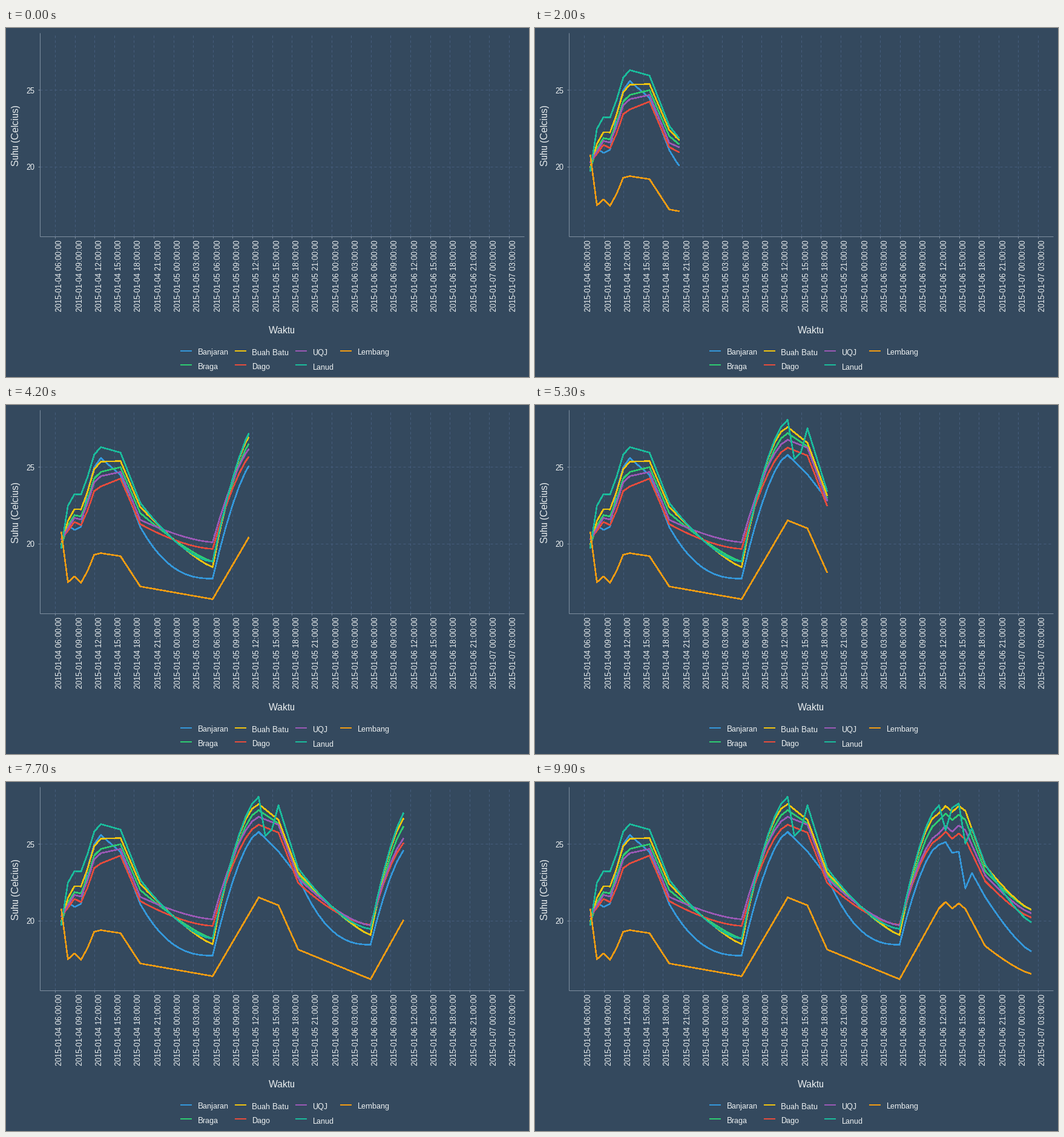
These frames come from a looping animation (864x576 px, 10 s). A matplotlib script:

```python
import numpy as np
import matplotlib.pyplot as plt
from matplotlib.animation import FuncAnimation

W, H = 864, 576
FRAMES, INTERVAL = 100, 100
HOURS = 68
LEFT, RIGHT, TOP, BOTTOM = 55, 855, 7, 343
BG, GRID, AXIS, INK = "#34495e", "#465d7d", "#7f8fa0", "#ecf0f1"

plt.rcParams.update({
    "font.family": "Liberation Sans",
    "text.hinting": "native",
    "text.hinting_factor": 1,
    "path.simplify": False,
})

# Turning points shared by all stations: dawns, noons and evenings
TURNS = np.array([0, 1, 6, 9, 12, 23, 30, 33, 36, 47, 53, 57, 60, 67])
RISES, NIGHTS, LAST = (23, 47), (12, 36), 60

# name, colour, heights at the turns, bend of rises, bend of nights, cloud dips
STATIONS = [
    ("Banjaran", "#3498db",
     [231, 198, 87, 115, 201, 286, 82, 114, 156, 268, 103, 130, 189, 279],
     1.6, 2.5, {2: 30, 3: 27, 57: 45}),
    ("Braga", "#2ecc71",
     [231, 199, 110, 102, 178, 258, 46, 68, 153, 252, 63, 62, 146, 210],
     1.65, 1.25, {}),
    ("Buah Batu", "#f1c40f",
     [229, 191, 93, 92, 168, 267, 36, 62, 149, 252, 51, 47, 137, 210],
     1.75, 1.25, {}),
    ("Dago", "#e74c3c",
     [221, 207, 134, 121, 196, 237, 70, 83, 166, 235, 92, 94, 163, 223],
     1.6, 1.6, {}),
    ("UQJ", "#9b59b6",
     [222, 203, 117, 110, 189, 226, 57, 70, 158, 236, 84, 79, 153, 216],
     1.6, 1.5, {}),
    ("Lanud", "#1abc9c",
     [236, 166, 69, 78, 161, 258, 24, 38, 142, 242, 38, 46, 135, 231],
     1.55, 1.6, {31: 60, 32: 45, 54: 50, 57: 55}),
    ("Lembang", "#f39c12",
     [209, 292, 244, 249, 299, 320, 190, 203, 276, 325, 208, 209, 270, 316],
     1.0, 1.0, {}),
]


def curve(levels, rise, night, dips):
    """Hourly heights: ease out between turns, then add weather kinks."""
    bends = {h: rise for h in RISES} | {h: night for h in NIGHTS} | {LAST: 1.3}
    ys = np.interp(hours, TURNS, levels)
    for i, (a, b) in enumerate(zip(TURNS, TURNS[1:])):
        t = np.arange(b - a) / (b - a)
        ease = 1 - (1 - t) ** bends.get(a, 1)
        ys[a:b] = levels[i] + (levels[i + 1] - levels[i]) * ease
    ys += np.interp(hours, [2, 3, 4, 5, 6], [0, 20, 10, -7, 0])
    ys += np.interp(hours, [53, 54, 55, 56, 57], [0, -11, 0, -9, 0])
    for hour, depth in dips.items():
        ys[hour] += depth
    return ys


def hour_x(hour):
    return 80 + hour * 750 / 69


fig = plt.figure(figsize=(W / 72, H / 72), dpi=72, facecolor=BG)
ax = fig.add_axes([0, 0, 1, 1])
ax.set_xlim(-0.5, W - 0.5)
ax.set_ylim(H - 0.5, -0.5)
ax.axis("off")


def rule(x, y, color, **kw):
    ax.plot(x, y, color=color, lw=1, solid_capstyle="butt", **kw)


def label(x, y, text, size=13, ha="left", rotation=0):
    ax.text(x, y, text, size=size, color=INK, ha=ha, va="baseline",
            rotation=rotation, rotation_mode="anchor")


dash = (0, (4, 4))
for hour in range(0, 72, 3):
    x = round(hour_x(hour))
    rule([x, x], [BOTTOM, TOP], GRID, ls=dash)
    rule([x, x], [BOTTOM, BOTTOM + 3], AXIS)
    day, clock = divmod(6 + hour, 24)
    label(x + 12, 468, f"2015-01-{4 + day:02d} {clock:02d}:00:00", rotation=90)

for temp, y in ((25, 101), (20, 228)):
    rule([LEFT, RIGHT], [y, y], GRID, ls=dash)
    rule([LEFT - 3, LEFT], [y, y], AXIS)
    label(47, y + 6, str(temp), ha="right")

rule([LEFT, LEFT], [TOP, BOTTOM], AXIS, zorder=4)
rule([LEFT, RIGHT], [BOTTOM, BOTTOM], AXIS, zorder=4)
label(21, 227, "Suhu (Celcius)", 16, rotation=90)
label(433, 504, "Waktu", 16)

hours = np.arange(HOURS)
xs = hour_x(hours + 1)
# Each reading lands on a whole frame; the gaps are interpolated
arrival = np.round(hours * (FRAMES - 1) / (HOURS - 1))

lines, curves = [], []
for i, (name, color, *shape) in enumerate(STATIONS):
    col, row = divmod(i, 2)
    x0 = (287, 377, 477, 551)[col]
    y0 = 532.5 + 23 * row
    ax.plot([x0, x0 + 19], [y0, y0], color=color, lw=2, solid_capstyle="butt")
    label(x0 + 29, 539 + 24 * row, name)
    curves.append(curve(*shape))
    lines += ax.plot([], [], color=color, lw=1.5, antialiased=False,
                     solid_capstyle="butt", solid_joinstyle="round", zorder=3)


def update(frame):
    pos = np.interp(frame, arrival, hours)
    at = np.append(hours[hours < pos], pos)
    for line, ys in zip(lines, curves):
        line.set_data(np.interp(at, hours, xs), np.interp(at, hours, ys))
    return lines


anim = FuncAnimation(fig, update, frames=FRAMES, interval=INTERVAL,
                     repeat=True, repeat_delay=0, blit=False)
plt.show()
```
